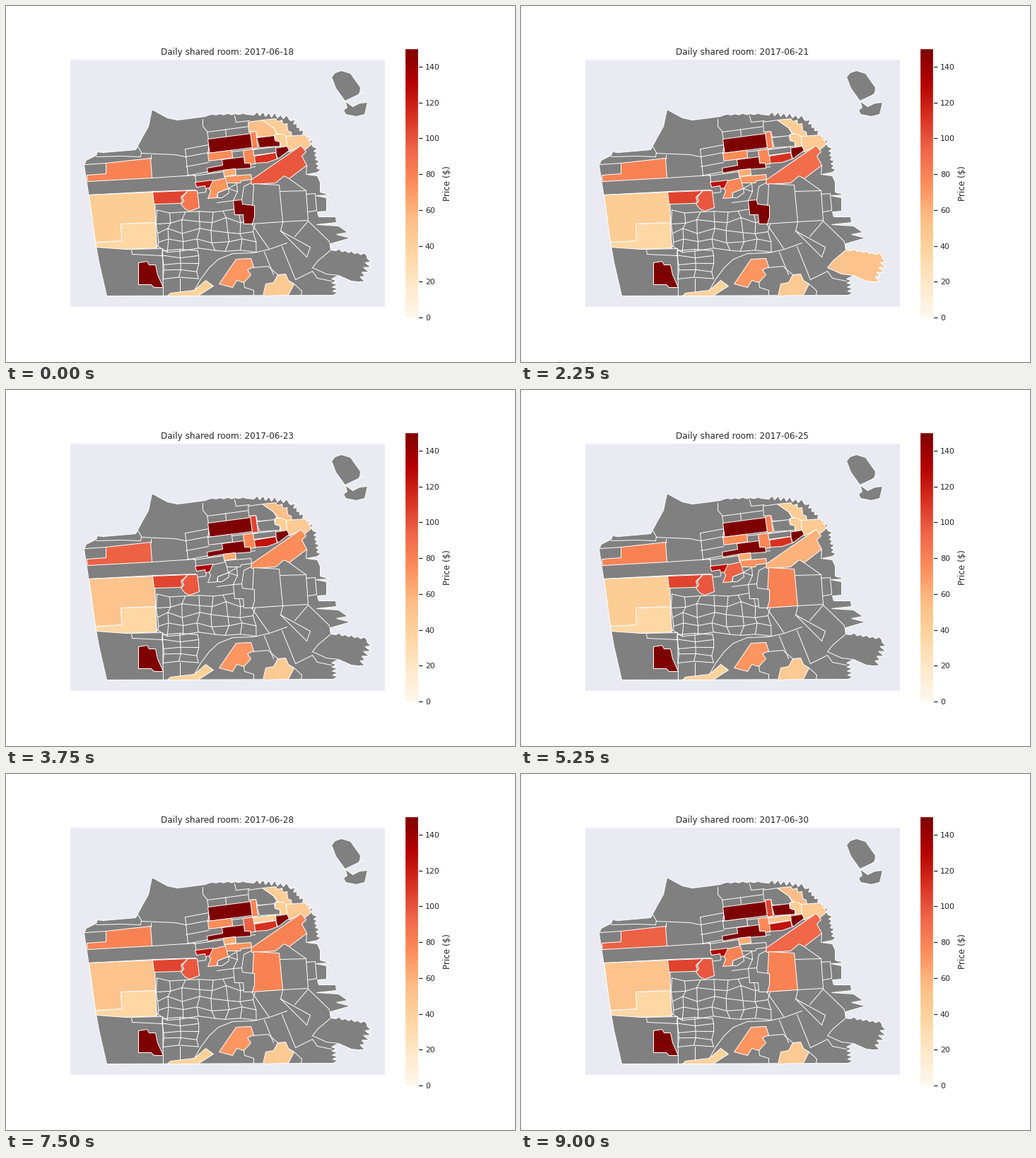
These frames come from a looping animation (720x504 px, 9.75 s). A matplotlib script:

```python
import numpy as np
import matplotlib.pyplot as plt
from matplotlib.animation import FuncAnimation
from matplotlib.cm import ScalarMappable
from matplotlib.colors import Normalize
from matplotlib.patches import Polygon

INK, GREY = "#262626", "#808080"
DAYS = 13
WEEKEND = (5, 6, 12)
W, H = 720, 504
rng = np.random.default_rng(4)

plt.rcParams.update({
    "font.family": "DejaVu Sans", "text.color": INK,
    "axes.labelcolor": INK, "ytick.color": INK,
    "axes.edgecolor": "white", "axes.linewidth": 1.25,
})
fig = plt.figure(figsize=(W / 72, H / 72), dpi=72, facecolor="white")


def pixel_axes(left, top, right, bottom):
    return fig.add_axes([left / W, 1 - bottom / H,
                         (right - left) / W, (bottom - top) / H])


# Map axes use pixel coordinates, y downwards
ax = pixel_axes(90, 75.4, 536.4, 426.1)
ax.set(facecolor="#EAEAF2", xlim=(89.5, 535.9), ylim=(425.6, 74.9),
       xticks=[], yticks=[])
title = ax.set_title("", fontsize=12, pad=6)

prices = ScalarMappable(Normalize(0, 150), "OrRd")
cax = pixel_axes(564.3, 60.48, 583.33, 441)
bar = fig.colorbar(prices, cax=cax)
bar.outline.set(edgecolor="white", linewidth=1.25)
bar.set_ticks(range(0, 150, 20))
bar.set_label("Price ($)", fontsize=12)
cax.tick_params(length=6, width=1.25, labelsize=11, pad=3.5)


def pts(*flat):
    return np.reshape(flat, (-1, 2))


def block(x, y, w, h, tilt=7.5):
    """Rectangle in the tilted street grid, from its top left corner."""
    a = np.radians(tilt)
    right = w * np.array([np.cos(a), -np.sin(a)])
    down = h * np.array([np.sin(a), np.cos(a)])
    return np.array([x, y]) + [0 * right, right, right + down, down]


def comb(x0, y0, x1, y1, teeth, depth):
    """Shore with piers sticking out to the left of the walking direction."""
    t = np.linspace(0, 1, 2 * teeth + 1)[:, None]
    along = np.array([x1 - x0, y1 - y0])
    out = np.array([along[1], -along[0]]) / np.hypot(*along)
    reach = depth * rng.uniform(0.5, 1, t.shape)
    reach[::2] = 0
    return np.array([x0, y0]) + t * along + reach * out


def shape(xy, z=1):
    return ax.add_patch(Polygon(xy, facecolor=GREY, edgecolor="white",
                                linewidth=1, zorder=z))


def border(*flat):
    ax.plot(*pts(*flat).T, color="white", lw=1, zorder=1.5)


def mesh(x0, y0, x1, y1, cols, rows, wobble):
    """Irregular small districts: a lattice with shaken corners."""
    x, y = np.meshgrid(np.linspace(x0, x1, cols + 1),
                       np.linspace(y0, y1, rows + 1))
    x += rng.uniform(-wobble, wobble, x.shape)
    y += rng.uniform(-wobble, wobble, y.shape)
    for gx, gy in ((x, y), (x.T, y.T)):
        ax.plot(gx, gy, color="white", lw=1, zorder=1.5)


areas = []


def area(xy, steps, weekend=None):
    """steps: a fixed price, or {first day: price} held until the next step."""
    if not isinstance(steps, dict):
        steps = {0: steps}
    areas.append((shape(xy, 2), steps, weekend))


def price_on(day, steps, weekend):
    if weekend is not None and day in WEEKEND:
        return weekend
    return steps[max(first for first in steps if first <= day)]


# Land, clockwise from the north-west
bay = np.vstack([comb(466, 346, 510, 353, 5, 4),
                 comb(510, 356, 498, 390, 5, 10), pts(488, 389, 470, 381)])
shape(np.vstack([
    pts(110, 225, 113, 218, 127, 211, 129, 206, 137, 207, 183, 203, 192, 186,
        201, 170, 206, 146, 228, 158, 242, 161, 281, 156),
    comb(286, 154, 340, 153, 5, 2),
    comb(350, 154, 400, 160, 6, 8),
    comb(402, 162, 432, 195, 7, 6),
    comb(434, 199, 440, 235, 6, 6),
    pts(425, 238, 440, 240, 444, 249, 444, 263, 458, 267, 438, 268, 453, 271,
        453, 290, 440, 291, 442, 298, 466, 298, 467, 306, 439, 309, 470, 311,
        483, 320, 467, 323, 487, 328, 459, 336, 459, 345),
    bay,
    comb(460, 386, 462, 409, 4, 9),
    pts(142, 410, 131, 362, 126, 334, 116, 264)]))

# Islands
shape(pts(460, 100, 465, 94, 474, 91, 487, 95, 501, 115, 500, 124,
          479, 134, 466, 116))
shape(pts(479, 134, 490, 142, 500, 137, 511, 136, 507, 153, 495, 156,
          480, 153, 477, 147, 482, 143))
border(497, 127, 500, 122, 508, 123)

# West
area(pts(114, 239, 141, 237, 141, 222, 204, 215, 206, 243, 115, 248), 80, 95)
area(pts(126, 334, 163, 332, 162, 308, 211, 306, 213, 342, 170, 344, 127, 341), 35)
area(pts(117, 267, 210, 263, 211, 306, 162, 308, 163, 332, 126, 334),
     {0: 43, 10: 50}, 50)
area(pts(207, 263, 257, 261, 247, 270, 249, 277, 245, 279, 209, 280), 105)
area(pts(257, 261, 270, 261, 273, 285, 259, 290, 253, 287, 247, 280,
         251, 276, 249, 270), {0: 86, 1: 98})
area(pts(267, 249, 292, 246, 294, 251, 288, 257, 282, 258, 281, 254,
         269, 256), 125, 132)

# North
area(block(285, 188, 61, 20), 150)
area(block(345, 178, 8, 24), 80, 105)
area(block(285, 208, 34, 11), 75, 0)
area(block(335, 204, 15, 21), {0: 78, 8: 95}, 77)
area(pts(284, 229, 306, 225, 305, 217, 336, 213, 337, 222, 345, 222,
         346, 229, 307, 232, 285, 236), 150)
area(block(307, 232, 17, 9), 63)
area(pts(309, 241, 346, 238, 347, 245, 332, 247, 331, 250, 309, 250), 73,
     0)
area(pts(292, 247, 310, 243, 314, 258, 299, 264, 298, 271, 285, 272,
         289, 262, 287, 258), {0: 72, 1: 78, 5: 0, 7: 95, 8: 78, 11: 85, 12: 80})
area(pts(299, 264, 314, 258, 315, 264, 305, 271, 299, 271), {0: 0, 9: 52, 10: 0})
area(pts(342, 164, 362, 161, 378, 172, 385, 184, 355, 185, 353, 177, 343, 178),
     {0: 53, 1: 0})
area(pts(362, 161, 381, 159, 384, 163, 390, 161, 391, 167, 397, 166, 398, 176,
         403, 178, 404, 185, 396, 184, 384, 180, 378, 172), 43, 54)
area(pts(380, 181, 390, 181, 396, 184, 397, 198, 388, 200, 387, 192, 380, 190), 43)
area(pts(396, 184, 423, 182, 432, 195, 421, 204, 417, 198, 400, 206, 397, 198), 45)
area(pts(354, 186, 379, 183, 380, 190, 387, 192, 387, 198, 358, 200),
     {0: 150, 1: 0, 11: 150})
area(pts(379, 201, 397, 198, 400, 204, 384, 216), 150)
area(block(349, 203, 32, 8), {0: 0, 8: 42, 12: 50})
area(pts(351, 212, 381, 207, 383, 216, 369, 221, 352, 222), 112, 124)

# Centre and east
area(pts(346, 246, 417, 197, 424, 206, 418, 212, 425, 225, 400, 244,
         393, 240, 381, 250, 347, 252),
     {0: 98, 2: 90, 4: 75, 6: 60, 8: 80, 12: 93})
area(pts(350, 251, 386, 253, 391, 305, 347, 308),
     {0: 0, 6: 80, 9: 110, 10: 80})
area(pts(321, 275, 333, 274, 334, 280, 351, 282, 351, 298, 348, 308, 336, 308,
         335, 295, 323, 295), {0: 150, 4: 0, 8: 150, 10: 0})
area(np.vstack([bay, pts(453, 379, 433, 370, 441, 360, 459, 345)]),
     {0: 0, 2: 50, 5: 0, 11: 50, 12: 0})

# South
area(pts(187, 363, 199, 361, 202, 366, 211, 366, 214, 380, 222, 398, 209, 398,
         205, 394, 187, 394), 150)
area(pts(301, 393, 325, 358, 346, 357, 350, 369, 341, 373, 346, 380, 336, 391,
         326, 388, 320, 398), 72)
area(pts(363, 410, 367, 393, 378, 391, 384, 380, 395, 379, 399, 388,
         407, 393, 399, 409), 45)
area(pts(228, 410, 232, 406, 266, 402, 282, 388, 293, 396, 271, 410), 40)

# Borders of the northern street grid
border(111, 224, 141, 222)
border(127, 213, 163, 212, 190, 213, 191, 207, 186, 198)
border(191, 208, 239, 210, 253, 213)
border(204, 215, 204, 210)
border(206, 243, 267, 239, 269, 256)
border(117, 267, 210, 262, 268, 260)
border(253, 202, 257, 240)
for y in (202, 213, 227, 240):
    border(254, y, 286, y - 6)
border(278, 160, 278, 170, 284, 177, 287, 195, 285, 208)
border(284, 178, 343, 170, 343, 164)
border(310, 174, 311, 184)
border(323, 155, 325, 164, 344, 162)
for y in (214, 239):
    border(319, y - 8, 352, y - 12)
border(266, 240, 308, 234)
border(268, 265, 282, 263, 283, 257)

# Borders of the hills, the eastern and the southern districts
mesh(213, 290, 350, 344, 7, 4, 5)
mesh(221, 344, 271, 385, 2, 4, 2)
border(326, 262, 314, 258, 326, 251, 327, 262, 321, 275, 298, 278)
border(333, 274, 336, 255, 346, 250)
border(391, 305, 427, 303, 424, 261, 386, 262)
border(400, 244, 424, 261)
border(425, 225, 424, 238)
border(424, 266, 437, 265, 439, 289, 427, 291)
border(347, 308, 372, 344)
border(391, 306, 388, 318, 430, 341, 425, 355, 388, 318)
border(408, 326, 427, 304, 457, 333, 459, 345)
border(170, 344, 221, 343, 222, 410)
border(177, 345, 178, 351, 221, 353)
border(245, 385, 245, 404)
border(266, 402, 275, 386, 287, 370, 300, 358, 320, 350, 350, 349, 372, 344, 397, 335)
border(365, 348, 378, 380)
border(390, 340, 409, 387, 433, 375, 440, 385, 460, 389)
border(349, 370, 370, 368, 384, 380)
border(336, 391, 337, 398, 350, 402, 350, 410)
border(407, 393, 418, 403, 417, 410)


def draw(day):
    title.set_text(f"Daily shared room: 2017-06-{18 + day}")
    for patch, steps, weekend in areas:
        price = price_on(day, steps, weekend)
        patch.set_facecolor(prices.to_rgba(price) if price else GREY)
    return []


anim = FuncAnimation(fig, draw, frames=DAYS, interval=750, repeat=True)
plt.show()
```
